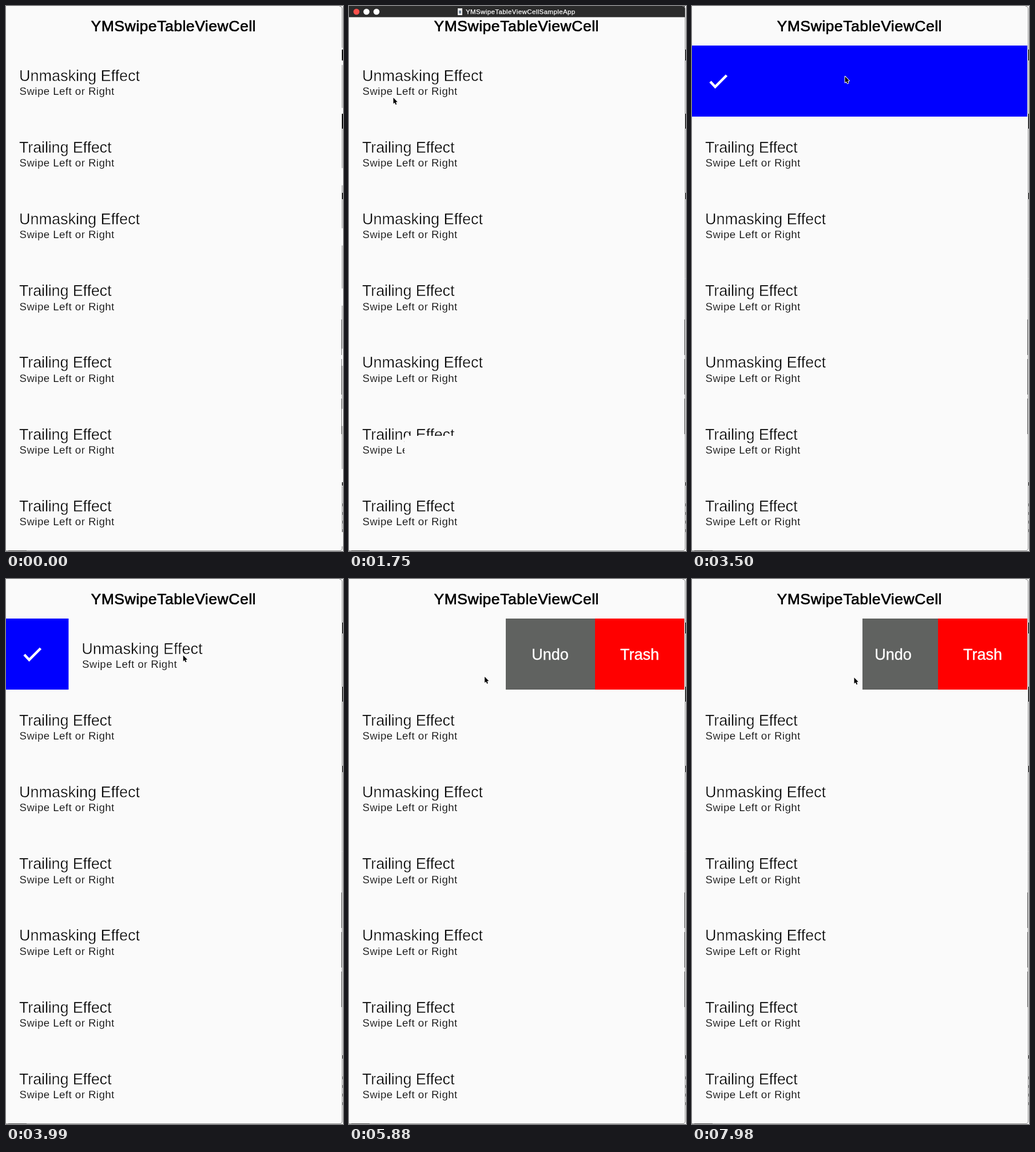
These frames come from a looping animation (589x951 px, 8000 ms). An HTML page with a canvas:

```html
<!DOCTYPE html>
<html lang="en">
<head>
<meta charset="utf-8">
<title>Swipe cells</title>
<style>
html, body { margin: 0; width: 100%; height: 100%; overflow: hidden; background: #fafafa; }
canvas { display: block; width: 589px; height: 951px; }
</style>
</head>
<body>
<canvas id="stage" width="589" height="951"></canvas>
<script>
const ctx = document.getElementById('stage').getContext('2d');
const W = 589, H = 951, LOOP = 8000, STEP = 70, START = 1750;
const BG = '#fafafa', FONT = '"Liberation Sans", Arial, sans-serif';
const CELL = { y: 69, h: 124, w: 586, pitch: 125.2 };
const OPEN = 313, FULL = 587;
const UNMASKING = { name: 'Unmasking Effect', gap: 0 };
const TRAILING = { name: 'Trailing Effect', gap: -0.15 };

const clamp = v => Math.max(0, Math.min(1, v));

// Eased progress from 0 to 1
function ease(t, start, duration) {
  const k = clamp((t - start) / duration);
  return k * k * (3 - 2 * k);
}

// Horizontal offset of the first cell: swipe right, close, swipe left, close, swipe left
function cellOffset(t) {
  return FULL * (ease(t, 2130, 890) - ease(t, 3780, 290))
    - OPEN * (ease(t, 4900, 840) - ease(t, 6580, 290) + ease(t, 7560, 508));
}

function pointerAt(t) {
  let x = 77, y = 160;
  const moveTo = (toX, toY, start, duration) => {
    const k = ease(t, start, duration);
    x += (toX - x) * k;
    y += (toY - y) * k;
  };
  moveTo(540, 135.5, 2130, 540);
  moveTo(267, 123, 2870, 630);
  moveTo(537, 188, 3780, 840);
  moveTo(537, 165, 4620, 210);
  moveTo(537 - OPEN, 171, 4900, 840);
  moveTo(345, 166, 5810, 350);
  moveTo(571, 172, 6780, 570);
  moveTo(571 - OPEN, 172, 7560, 508);
  return [x, y];
}

function rect(x, y, w, h, color) {
  ctx.fillStyle = color;
  ctx.fillRect(x, y, w, h);
}

// Positive weight thickens the letters, negative weight thins them
function text(str, x, y, size, { color = '#000', gap = 0, weight = 0, align = 'left' } = {}) {
  ctx.font = `${size}px ${FONT}`;
  ctx.letterSpacing = gap + 'px';
  ctx.textAlign = align;
  ctx.fillStyle = color;
  ctx.fillText(str, x, y);
  if (weight) {
    ctx.strokeStyle = weight > 0 ? color : BG;
    ctx.lineWidth = Math.abs(weight);
    ctx.lineJoin = 'round';
    ctx.strokeText(str, x, y);
  }
}

function label(kind, x, y) {
  text(kind.name, x + 23, y + 130.5, 27, { gap: kind.gap, weight: -0.5 });
  text('Swipe Left or Right', x + 23.6, y + 155, 18.5, { gap: 0.52, weight: -0.25 });
}

function check() {
  ctx.beginPath();
  ctx.moveTo(32, 132);
  ctx.lineTo(40.5, 141);
  ctx.lineTo(60.5, 121);
  ctx.strokeStyle = '#fff';
  ctx.lineWidth = 4.5;
  ctx.lineJoin = 'miter';
  ctx.stroke();
}

function swipeCell(dx) {
  const { y, h, w } = CELL;
  ctx.save();
  ctx.beginPath();
  ctx.rect(0, y, w, h);
  ctx.clip();
  if (dx > 0) {
    rect(0, y, w, h, '#00f');
    check();
  } else if (dx < 0) {
    const white = { color: '#fff', weight: 0.4, align: 'center' };
    rect(274, y, 156, h, '#606260');
    rect(430, y, 156, h, '#f00');
    text('Undo', 351.5, 140.5, 27, white);
    text('Trash', 508, 140.5, 27, white);
  }
  rect(dx, y, w, h, BG);
  label(UNMASKING, dx, 0);
  ctx.restore();
}

function titleBar() {
  rect(0, 0, 587, 19.5, '#2b2b2b');
  ['#fc4f4b', '#fff', '#fff'].forEach((color, i) => {
    ctx.beginPath();
    ctx.arc(13 + i * 17.5, 10, 5.3, 0, Math.PI * 2);
    ctx.fillStyle = color;
    ctx.fill();
  });
  rect(190, 4, 8, 12, '#eee');
  rect(192, 8, 4, 5, '#789');
  text('YMSwipeTableViewCellSampleApp', 204, 14, 11.5, { color: '#fff', gap: 0.4, weight: 0.25 });
}

function pointer(x, y) {
  ctx.save();
  ctx.translate(x, y);
  ctx.beginPath();
  ctx.moveTo(0.5, 0);
  ctx.lineTo(0.5, 10.5);
  ctx.lineTo(2.9, 8.4);
  ctx.lineTo(4.6, 12.2);
  ctx.lineTo(6.3, 11.4);
  ctx.lineTo(4.7, 7.8);
  ctx.lineTo(7.8, 7.6);
  ctx.closePath();
  ctx.strokeStyle = '#fff';
  ctx.lineWidth = 2;
  ctx.lineJoin = 'round';
  ctx.stroke();
  ctx.fillStyle = '#000';
  ctx.fill();
  ctx.restore();
}

// Window outline and the slivers of whatever lies behind its right side
function edges(running) {
  ctx.beginPath();
  ctx.moveTo(583, 0.5);
  ctx.quadraticCurveTo(587.5, 0.5, 587.5, 5);
  ctx.lineTo(587.5, 946);
  ctx.quadraticCurveTo(587.5, 950.5, 583, 950.5);
  ctx.strokeStyle = '#858585';
  ctx.lineWidth = 1;
  ctx.setLineDash(running ? [] : [75, 30]);
  ctx.stroke();
  ctx.setLineDash([]);
  rect(0, 950, 584, 1, '#888');
  rect(4, 950, 32, 1, '#444');

  const x = running ? 588 : 587;
  rect(x, 76, 2, 19, '#000');
  rect(x, 188, 2, 26, '#000');
  rect(x, 326, 2, 11, '#222');
  rect(x, 831, 2, 6, '#444');
  for (let y = 868; y < 920; y += 15) rect(x, y, 2, 5, '#888');
  for (let y = 547; y < 700; y += 69) rect(586, y, 1, 62, '#777');
}

function draw(t) {
  const running = t >= START;
  rect(0, 0, W, H, BG);
  text('YMSwipeTableViewCell', 148.5, 44, 26.5, { gap: 0.53, weight: 0.7 });

  for (let i = 1; i < 7; i++) {
    const unmasking = i === 2 || (i === 4 && running);
    label(unmasking ? UNMASKING : TRAILING, 0, i * CELL.pitch);
  }
  swipeCell(cellOffset(t));

  // Window chrome fades in, then out again as the first swipe starts
  const alpha = Math.min(clamp((t - 280) / 350), clamp((2450 - t) / 350));
  if (alpha > 0) {
    ctx.globalAlpha = alpha;
    titleBar();
    ctx.beginPath();
    ctx.roundRect(97, 750, 393, 35, 4);
    ctx.fillStyle = BG;
    ctx.fill();
    ctx.globalAlpha = 1;
  }

  edges(running);
  if (running) pointer(...pointerAt(t));
}

function frame(now) {
  const t = now % LOOP;
  draw(Math.floor(t / STEP) * STEP);
  requestAnimationFrame(frame);
}
requestAnimationFrame(frame);
</script>
</body>
</html>
```
